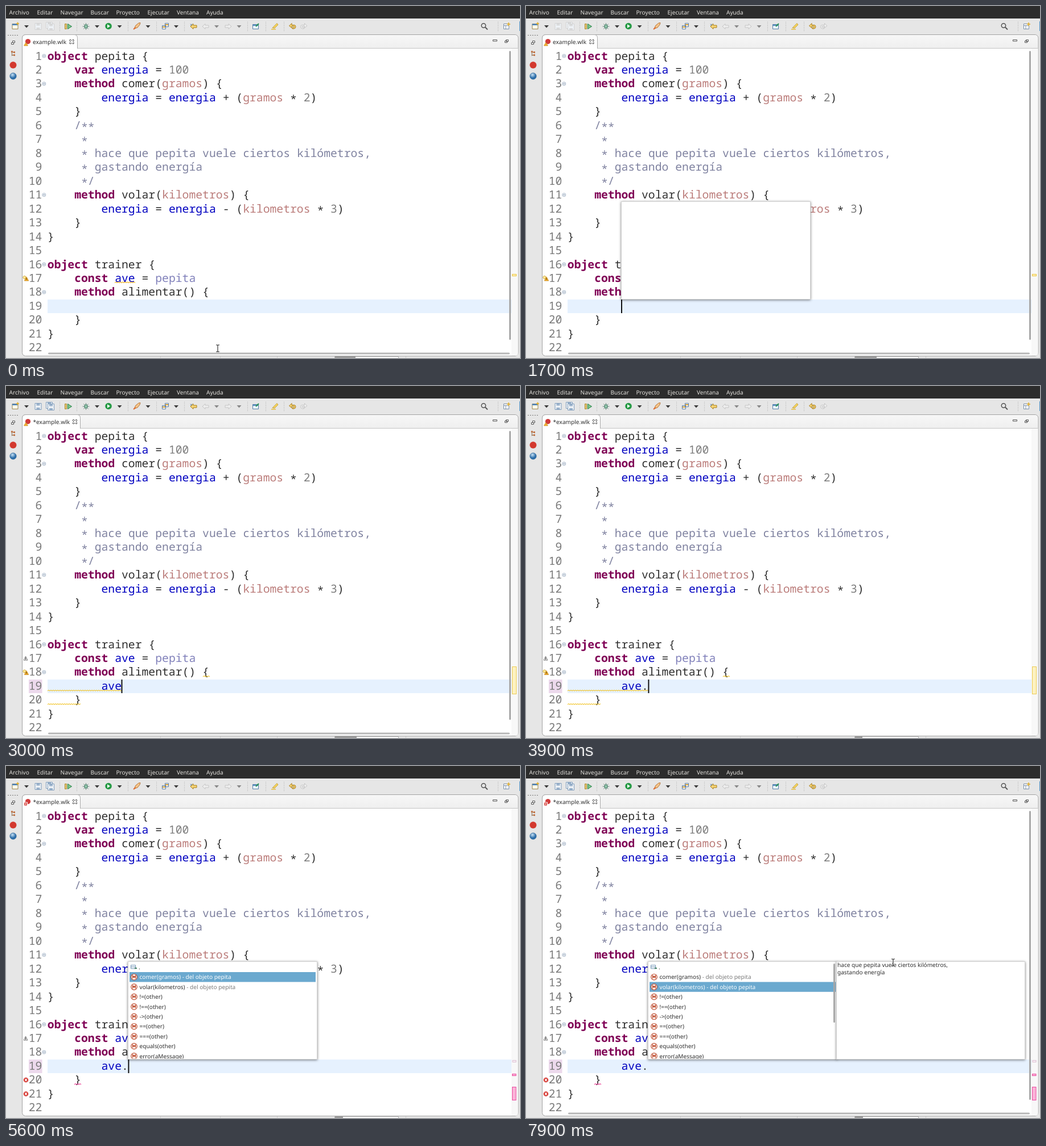
An HTML page that plays this animation: 903 by 620 pixels, repeating every 8 s.

```html
<!DOCTYPE html>
<html lang="es">
<head>
<meta charset="utf-8">
<title>Editor</title>
<style>
html, body { margin: 0; height: 100%; overflow: hidden; background: #e6e6e6; }
svg { display: block; width: 903px; height: 620px; }
text { font: 10.1px "Noto Sans", "Open Sans", sans-serif; fill: #2e2e2e; text-rendering: geometricPrecision; white-space: pre; }
#menu text { fill: #e2e0dc; }
#code text, #nums text { font: 19.73px "Noto Sans Mono", "DejaVu Sans Mono", monospace; fill: #2f2f2f; }
#nums text { fill: #787878; text-anchor: end; }
#code .k { fill: #7f0055; font-weight: 700; }
#code .f { fill: #0000c0; }
#code .p { fill: #bb7c7a; }
#code .n { fill: #7d7d7d; }
#code .c { fill: #7f82a0; }
#code .r { fill: #8080ba; }
.dim { fill: #7a7a7a; }
.sel rect { fill: #6ba9cf; }
.sel text, .sel .dim { fill: #fff; }
.box { fill: #fff; stroke: #d2d2d2; filter: drop-shadow(0 1px 2px rgba(0,0,0,.5)); }
.wave { fill: none; stroke-width: 1.1; }

.a { animation: 8s step-end infinite; }
.clean { animation-name: clean; }
.dirty { animation-name: dirty; }
.warn { animation-name: warn; }
.noerr { animation-name: noerr; }
.err { animation-name: err; }
.dot { animation-name: dot; }
.bars { animation-name: bars; }
.thick { animation-name: thick; }
.caret { animation-name: caret; }
.mouse { animation-name: mouse; }
.heap { animation-name: heap; }
.first { animation-name: first; }
.fill { animation-name: fill; }
.pop { animation-name: pop; }
.s0 { animation-name: s0; }
.s1 { animation-name: s1; }
.s2 { animation-name: s2; }
.doc { animation-name: doc; }
.late { animation-name: late; }
@keyframes clean { 0% { opacity: 1 } 37.5%, to { opacity: 0 } }
@keyframes dirty { 0% { opacity: 0 } 37.5%, to { opacity: 1 } }
@keyframes warn { 0% { opacity: 0 } 37.5% { opacity: 1 } 56.25%, to { opacity: 0 } }
@keyframes noerr { 0% { opacity: 1 } 56.25%, to { opacity: 0 } }
@keyframes err { 0% { opacity: 0 } 56.25%, to { opacity: 1 } }
@keyframes dot { 0% { opacity: 0 } 47.5%, to { opacity: 1 } }
@keyframes bars { 0% { opacity: 1 } 40% { opacity: .5 } 41.25% { opacity: 0 } 92.5% { opacity: .5 } 93.75%, to { opacity: 1 } }
@keyframes thick { 0% { opacity: 0 } 2.5% { opacity: 1 } 6.25%, to { opacity: 0 } }
@keyframes caret {
  0% { opacity: 0; transform: none }
  6.25% { opacity: 1; transform: none }
  13.75% { opacity: 0; transform: none }
  21.25% { opacity: 1; transform: none }
  30% { opacity: 0; transform: none }
  37.5% { opacity: 1; transform: translateX(35.5px) }
  47.5% { opacity: 1; transform: translateX(47.4px) }
  56.25% { opacity: 0; transform: translateX(47.4px) }
  61.25% { opacity: 1; transform: translateX(47.4px) }
  63.75% { opacity: 0; transform: translateX(47.4px) }
  70% { opacity: 1; transform: translateX(47.4px) }
  78.75% { opacity: 0; transform: translateX(47.4px) }
  90% { opacity: 1; transform: translateX(47.4px) }
  97.5%, to { opacity: 0; transform: translateX(47.4px) }
}
@keyframes mouse {
  0% { opacity: 1; transform: translate(372px, 603px) }
  2.5% { opacity: 1; transform: translate(372px, 607px) }
  3.75% { opacity: 0; transform: translate(372px, 607px) }
  92.5% { opacity: 1; transform: translate(400px, 604px) }
  93.75% { opacity: 1; transform: translate(478px, 545px) }
  95% { opacity: 1; transform: translate(552px, 462px) }
  96.25% { opacity: 1; transform: translate(606px, 398px) }
  97.5% { opacity: 1; transform: translate(634px, 360px) }
  98.75%, to { opacity: 1; transform: translate(645px, 346px) }
}
@keyframes heap { 0% { width: 36px } 21.25% { width: 38px } 40% { width: 12px } 47.5% { width: 13px } 61.25%, to { width: 14px } }
@keyframes first { 0% { opacity: 0 } 21.25% { opacity: 1 } 30%, to { opacity: 0 } }
@keyframes fill { 0% { opacity: 0 } 22.5% { opacity: 1 } 30%, to { opacity: 0 } }
@keyframes pop { 0% { opacity: 0 } 61.25%, to { opacity: 1 } }
@keyframes s0 { 0% { opacity: 0 } 61.25% { opacity: 1 } 70%, to { opacity: 0 } }
@keyframes s1 { 0% { opacity: 0 } 70% { opacity: 1 } 76.25%, to { opacity: 0 } }
@keyframes s2 { 0% { opacity: 0 } 76.25%, to { opacity: 1 } }
@keyframes doc { 0% { opacity: 0 } 82.5%, to { opacity: 1 } }
@keyframes late { 0% { opacity: 0 } 92.5%, to { opacity: 1 } }
</style>
</head>
<body>
<svg viewBox="0 0 903 620">
  <defs>
    <linearGradient id="strip" x2="0" y2="1"><stop stop-color="#f7f7f7"/><stop offset="1" stop-color="#efefef"/></linearGradient>
    <radialGradient id="globe" cx=".4" cy=".3"><stop stop-color="#c8e2f5"/><stop offset="1" stop-color="#2a6ca8"/></radialGradient>
    <clipPath id="list"><rect x="216" y="346" width="329" height="169.5"/></clipPath>
    <path id="down" d="M-4-2h8l-4 4.5z"/>
    <path id="back" d="M-6 0l5-4.500v2.500h6v4h-6v2.500z"/>
    <g id="floppy"><path d="M-5.500-5.500h11v11h-11z" fill="#eef2f6" stroke="currentColor"/><path d="M-3-5h6v3.500h-6zM-3 2h6v3h-6z" fill="currentColor" opacity=".75"/></g>
    <g id="method" fill="none" stroke="#bd4a2c" stroke-linejoin="round"><circle r="5.200" fill="#fff" stroke-width="1.200"/><path d="M-2.300 2.600v-5l2.300 3 2.300-3v5" stroke-width="1.500"/></g>
    <g id="bad"><circle r="4.300" fill="#d63a34"/><path d="M-1.700-2l3.400 4M1.700-2l-3.400 4" stroke="#fff" stroke-width="1.300"/></g>
    <g id="alert"><circle cx="-2" cy="-1.500" r="2.600" fill="#fdeb9a" stroke="#c99a28" stroke-width=".8"/><path d="M1.500-2.500l3.700 7h-7.400z" fill="#f3ae2c" stroke="#b87b12" stroke-width=".7"/><path d="M1.500 0v2.500" stroke="#402c00"/></g>
    <path id="close" d="M-3.500-3.500l2 0 1.500 1.500 1.500-1.500h2v2l-1.500 1.500 1.500 1.500v2h-2l-1.500-1.500-1.500 1.500h-2v-2l1.500-1.500-1.500-1.500z" fill="#fff" stroke="#444"/>
  </defs>

  <rect width="903" height="620" fill="#e6e6e6"/>
  <g id="menu"><rect width="903" height="22" fill="#2c2c2c"/></g>

  <g id="tools">
    <g fill="none" stroke="#a9a9a9" stroke-dasharray="1 2"><path id="seps"/><path d="M3 51.500h20" stroke="#777" stroke-dasharray="2 2"/></g>
    <path d="M11 31.500h10v9h-10z" fill="#fffbe9" stroke="#9a8552"/><path d="M11 31.500h10v2.500h-10z" fill="#4f86c0"/><path d="M20.500 28.500v5M18 31h5" stroke="#e2ad26" stroke-width="1.500"/>
    <g class="a clean" color="#d2d2d2"><use href="#floppy" x="56.500" y="36"/><use href="#floppy" x="76" y="34"/><use href="#floppy" x="79" y="37"/></g>
    <g class="a dirty" color="#7f9cbc"><use href="#floppy" x="56.500" y="36"/><use href="#floppy" x="76" y="34"/><use href="#floppy" x="79" y="37"/></g>
    <path d="M103.500 31.500h3v9h-3z" fill="#e7c873" stroke="#a98a35"/><path d="M108.500 31.500l7 4.500-7 4.500z" fill="#7cc489" stroke="#26834a"/>
    <path d="M136.500 31.500l8 9M144.500 31.500l-8 9M134.500 36h12M140.500 30v12" stroke="#5c8070" stroke-width=".9"/><ellipse cx="140.500" cy="36" rx="2.600" ry="3.300" fill="#9accae" stroke="#2d6b5a"/>
    <circle cx="180" cy="35.500" r="5.800" fill="#259a44"/><path d="M178 32.300l5 3.200-5 3.200z" fill="#fff"/>
    <path d="M225 40l3-6 5-4 3-.5-1 3.500-4 5z" fill="#f3c48a" stroke="#b9773a"/><path d="M224 41l4-3" stroke="#df6b2d" stroke-width="2"/>
    <path d="M274.500 34.500h6v6h-6zM279.500 30.500h6v6h-6z" fill="#fff" stroke="#5679a3"/><path d="M275 37h5M280 33h5" stroke="#d09d32" stroke-width="2"/>
    <g fill="#f7d676" stroke="#a87c17"><use href="#back" x="330" y="36"/><path id="turn" d="M497.500 35l4.500-4.500v3h4q3 0 3 3t-3 3.500h-3v-2h2q1.500 0 1.500-1.300t-1.500-1.200h-3v3z"/></g>
    <path d="M324 31.500l3 3m0-3l-3 3" stroke="#587b9f"/>
    <g fill="#eee" stroke="#c5c5c5"><use href="#back" x="351" y="36"/><use href="#back" transform="translate(390 36) scale(-1 1)"/><path d="M529 35l-4.500-4.500v3h-4q-3 0-3 3t3 3.500h3v-2h-2q-1.500 0-1.500-1.300t1.500-1.200h3v3z"/></g>
    <path d="M433.500 32.500h10v8h-10z" fill="#eaf3fa" stroke="#5580a8"/><path d="M434 33h9v2h-9z" fill="#5c90c0"/><path d="M439 36l5-5" stroke="#2c9556" stroke-width="2"/>
    <path d="M468 38.500l8-8 2 2.500-6 6z" fill="#f6d45d" stroke="#b89125" stroke-width=".8"/><path d="M466 41h8" stroke="#e9bc36" stroke-width="1.500"/>
    <circle cx="839" cy="34.500" r="3.700" fill="none" stroke="#555" stroke-width="1.500"/><path d="M842 37.500l4 4" stroke="#555" stroke-width="1.800"/>
    <path d="M874.500 31.500h9v9h-9zM874.500 34.500h9M878 34v6" fill="#fff" stroke="#7a8fa8"/><path d="M883 29v6M880 32h6" stroke="#e2ad26" stroke-width="1.500"/>
    <path d="M902 27h1v17h-1z" fill="#4f93c8"/>
    <g id="arrows" fill="#3a3a3a"/>
  </g>

  <g fill="#fff" stroke="#555">
    <path d="M11.500 61.500h4v3h-4zM9.500 64.500h4v3h-4z"/>
    <path d="M10.500 79v9M10.500 81.500h4M10.500 86.500h4" stroke="#8b6a4a"/>
  </g>
  <path d="M9 79h3v3h-3zM13 80h3v3h-3zM13 85h3v3h-3z" fill="#c2774a"/>
  <circle cx="12.500" cy="104" r="6" fill="#d3392f"/>
  <circle cx="12.500" cy="123.500" r="5.700" fill="url(#globe)" stroke="#3a6c98" stroke-width=".7"/>

  <path d="M271.500 617v3M376.500 617v3M476.500 617v3M702.500 617v3" stroke="#d2d2d2"/>
  <path d="M577.500 620v-2.500h112v2.500" fill="#fafafa" stroke="#b4b4b4"/>
  <rect class="a heap" x="578" y="617" width="36" height="3" fill="#9c9c9c"/>

  <rect x="28.500" y="50.500" width="871.500" height="566" rx="6" fill="#fff" stroke="#a2a2a2"/>
  <path d="M29 74v-17q0-6 6-6h858q6 0 6 6v17z" fill="url(#strip)"/>
  <path d="M29 74.500h870.500" stroke="#c4c4c4"/>
  <g fill="#fff" stroke="#a9a9a9">
    <path class="a clean" d="M28.500 76v-19q0-6.500 6.500-6.500h85q5.500 0 5.500 6v18.500"/>
    <path class="a dirty" d="M28.500 76v-19q0-6.500 6.500-6.500h90q5.500 0 5.500 6v18.500"/>
  </g>
  <path d="M29 73h3v10h-3z" fill="#fff"/>
  <circle cx="38.500" cy="62.500" r="4.600" fill="#cf3a3a"/>
  <path class="a noerr" d="M35 64l3.500 6h-7z" fill="#f5b335" stroke="#b87b12" stroke-width=".6"/>
  <path class="a err" d="M31.500 64h6v6h-6zM33 65.500l3 3m0-3l-3 3" fill="#d63a34" stroke="#fff"/>
  <g class="a clean"><text x="47" y="67">example.wlk</text><use href="#close" x="115.500" y="63"/></g>
  <g class="a dirty"><text x="47.500" y="67">*example.wlk</text><use href="#close" x="121" y="63"/></g>
  <g fill="#fff" stroke="#555"><path d="M855.500 59.500h7v2.500h-7z"/><path d="M878.500 59.500h4v3h-4zM876.500 61.500h4v3h-4z"/></g>

  <path d="M888 75h11.500v538q-1 3-4 3h-7.500z" fill="#f8f8f8"/>
  <rect x="73" y="517" width="815" height="24" fill="#e6f1fe"/>
  <rect class="a dirty" x="40" y="517" width="23.500" height="24" fill="#ecd9ec"/>
  <g id="nums"/>
  <g id="folds" fill="#f2f5f9" stroke="#93a5ba" stroke-width=".8"/>
  <g id="code"/>

  <g class="a clean">
    <use href="#alert" x="34.500" y="479.500"/>
    <path class="wave" data-w="191 226 487.500" stroke="#eeb21e"/>
    <rect x="889.500" y="472.500" width="7" height="3" fill="#fdf0bd" stroke="#eec73f"/>
  </g>
  <g class="a dirty"><path d="M34.500 476l3.500 7h-7z" fill="#f4f4f4" stroke="#6c6c6c" stroke-width=".9"/><path d="M34.500 478.300v3.700" stroke="#333"/></g>
  <g class="a warn">
    <use href="#alert" x="34.500" y="504"/>
    <g stroke="#f2c62f"><path class="wave" data-w="346 357 512"/><path class="wave" data-w="73 203 537"/><path class="wave a dot" data-w="203 214 537"/><path class="wave" data-w="73 131 561"/></g>
    <rect x="889.500" y="494.500" width="7" height="48" fill="#fdf2c2" stroke="#eccb52"/>
  </g>
  <g class="a err">
    <use href="#bad" x="35" y="553"/><use href="#bad" x="35" y="577.500"/>
    <path class="wave" data-w="120 132 561" stroke="#ee3f96"/>
    <rect x="890" y="518.500" width="6" height="3" fill="#faf0f6" stroke="#dcbfd3"/>
    <g fill="#fab4d8" stroke="#ec4ba0"><rect x="889.500" y="542.500" width="6.500" height="3"/><rect x="889.500" y="565.500" width="6.500" height="23"/></g>
  </g>

  <g class="a bars"><rect x="884" y="79" width="3" height="509" rx="1.500" fill="#a8a8a8"/><rect x="74" y="610.500" width="811" height="3" rx="1.500" fill="#b8b8b8"/></g>
  <rect class="a thick" x="75" y="606" width="809" height="8" rx="4" fill="#a8a8a8"/>
  <rect class="a caret" x="167" y="517" width="2" height="24" fill="#111"/>

  <g class="a first" transform="translate(-47 0)"><rect class="box" x="214.500" y="344.500" width="332" height="172"/><g id="early" class="a fill" clip-path="url(#list)"/></g>
  <g class="a pop">
    <rect class="box" x="214.500" y="344.500" width="332" height="172"/>
    <g id="calls" clip-path="url(#list)"/>
  </g>
  <g class="a doc">
    <rect class="box" x="545.500" y="344.500" width="331" height="172"/>
    <text x="547" y="354">hace que pepita vuele ciertos kilómetros,</text>
    <text x="547" y="366.800">gastando energía</text>
  </g>
  <rect class="a late" x="540" y="348" width="3" height="104" rx="1.500" fill="#a8a8a8"/>
  <g class="a mouse"><path d="M-3-6h2q1 0 1 1 0-1 1-1h2M0-5v10M-3 6h2q1 0 1-1 0 1 1 1h2" fill="none" stroke="#fff" stroke-width="2.600" opacity=".8"/><path d="M-3-6h2q1 0 1 1 0-1 1-1h2M0-5v10M-3 6h2q1 0 1-1 0 1 1 1h2" fill="none" stroke="#222" stroke-width="1.100"/></g>
</svg>
<script>
const $ = id => document.getElementById(id);
const add = (parent, tag, attrs, text) => {
  const el = document.createElementNS('http://www.w3.org/2000/svg', tag);
  for (const k in attrs) el.setAttribute(k, attrs[k]);
  if (text) el.textContent = text;
  return parent.appendChild(el);
};

const labels = ['Archivo', 'Editar', 'Navegar', 'Buscar', 'Proyecto', 'Ejecutar', 'Ventana', 'Ayuda'];
[5.5, 54.5, 95.5, 148.5, 193.5, 248.5, 300, 352].forEach((x, i) => add($('menu'), 'text', { x, y: 15 }, labels[i]));
$('seps').setAttribute('d', [94.5, 124.5, 214.5, 264.5, 313.5, 424.5, 456.5, 488.5, 864.5].map(x => `M${x} 28v16`).join(''));
for (const x of [36, 160, 199.5, 249.5, 299, 370, 409.5])
  add($('arrows'), 'use', { href: '#down', x, y: 36, opacity: x > 300 ? .55 : 1 });

const COL = 11.84, ROW = 24.47, LEFT = 72.8, BASE = 94.5;
const kinds = { object: 'k', var: 'k', method: 'k', const: 'k', energia: 'f', ave: 'f', gramos: 'p', kilometros: 'p' };
const lines = `object pepita {
    var energia = 100
    method comer(gramos) {
        energia = energia + (gramos * 2)
    }
    /**
     *
     * hace que pepita vuele ciertos kilómetros,
     * gastando energía
     */
    method volar(kilometros) {
        energia = energia - (kilometros * 3)
    }
}

object trainer {
    const ave = pepita
    method alimentar() {
        ave.
    }
}
`.split('\n');

lines.forEach((line, i) => {
  const y = BASE + i * ROW;
  const comment = /^ +[/*]/.test(line);
  add($('nums'), 'text', { x: 63.4, y }, String(i + 1));
  for (const { 0: word, index } of line.matchAll(/[\p{L}\d]+|\S/gu)) {
    let kind = comment ? 'c' : kinds[word] || (/\d/.test(word) ? 'n' : '');
    if (/= $/.test(line.slice(0, index)) && word === 'pepita') kind = 'r';
    if (i === 18) kind += word === '.' ? ' a dot' : ' a dirty';
    // asterisks sit at mid height
    add($('code'), 'text', { x: LEFT + index * COL, y: y + (word === '*' ? 3.5 : 0), class: kind }, word);
  }
  if (/^(object|.*method)/.test(line)) {
    add($('folds'), 'circle', { cx: 66.8, cy: y - 6.5, r: 3 });
    add($('folds'), 'path', { d: `M65.2 ${y - 6.5}h3.2`, stroke: '#5f7790' });
  }
});

for (const p of document.querySelectorAll('[data-w]')) {
  const [x1, x2, y] = p.dataset.w.split(' ').map(Number);
  let d = `M${x1} ${y}`;
  for (let x = x1, s = -1; x < x2; x += 2, s = -s) d += `l2 ${s * 1.4}`;
  p.setAttribute('d', d);
}

// one proposal row, optionally drawn as selected
function proposal(parent, text, i, selected) {
  const y = 354.3 + i * 17.4;
  const g = add(parent, 'g', selected ? { class: 'sel ' + selected } : {});
  if (selected) add(g, 'rect', { x: 217, y: y - 8.7, width: 327, height: 17.4 });
  if (text === '.') {
    add(g, 'path', { d: `M219.500 ${y - 3.5}h8v6h-8zM219.500 ${y - .5}h8`, fill: '#fff', stroke: '#6f93b5' });
    add(g, 'path', { d: `M226 ${y + 2}h4`, stroke: '#3f7d5c', 'stroke-width': 2 });
  } else if (text.includes('(')) add(g, 'use', { href: '#method', x: 225, y });
  else add(g, 'path', { d: `M220.500 ${y - 3.5}h8v6h-8z`, fill: '#fff', stroke: '#6f93b5' });
  const [head, tail] = text.split(/(?= - )/);
  const label = add(g, 'text', { x: text === '.' ? 233 : 234.5, y: y + 3.7 }, head);
  if (tail) add(label, 'tspan', { class: 'dim' }, tail);
}

const calls = ['.', 'comer(gramos) - del objeto pepita', 'volar(kilometros) - del objeto pepita', '!=(other)',
  '!==(other)', '->(other)', '==(other)', '===(other)', 'equals(other)', 'error(aMessage)'];
calls.forEach((c, i) => proposal($('calls'), c, i));
[0, 1, 2].forEach(i => proposal($('calls'), calls[i], i, 'a s' + i));

const words = ['ave', 'pepita', 'trainer', 'const', 'var', 'self', 'if', 'return', 'true', 'false'];
words.forEach((w, i) => proposal($('early'), w, i, i ? '' : 'on'));
</script>
</body>
</html>
```
